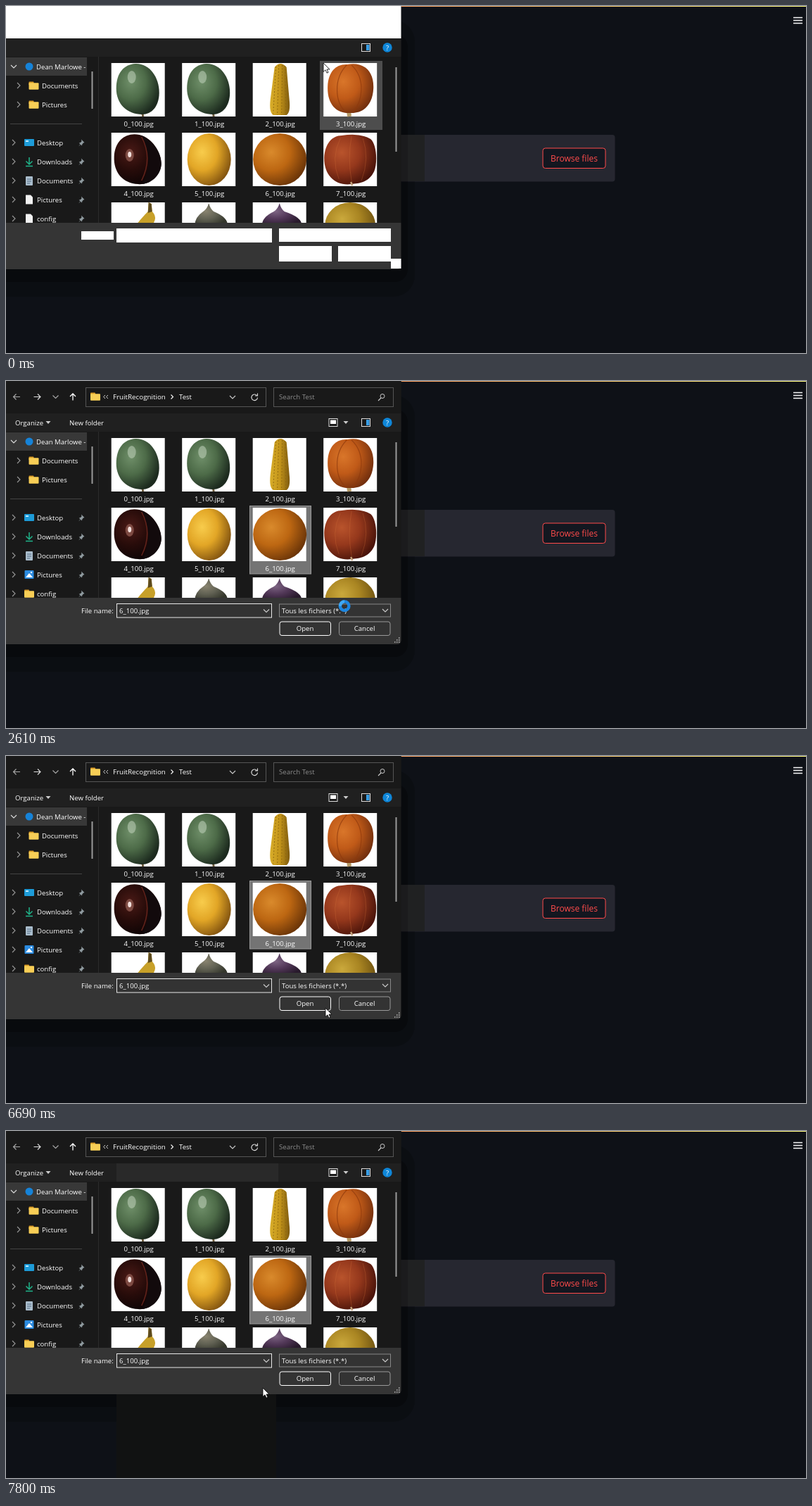
Animation of 1137x493 px, one loop 8 s. Source, as an HTML page:

```html
<!DOCTYPE html>
<html lang="en">
<head>
<meta charset="utf-8">
<title>File picker</title>
<style>
html, body { margin: 0; width: 100%; height: 100%; overflow: hidden; background: #0e1117; }
svg { display: block; width: 100vw; height: 100vh; }
text { font: 9.6px "Open Sans", "Noto Sans", sans-serif; fill: #fff; white-space: pre; }
</style>
</head>
<body>
<svg id="stage" viewBox="0 0 1137 493"></svg>
<script>
const LOOP = 8000;

// Markup helpers; text is centred on y with its baseline on a whole pixel
const text = (x, y, s, more = '') => `<text x="${x}" y="${Math.round(y + 3.5)}" ${more}>${s}</text>`;
const mid = (x, y, s, more = '') => text(x, y, s, `text-anchor="middle" ${more}`);
const rect = (x, y, w, h, fill, more = '') =>
  `<rect x="${x}" y="${y}" width="${w}" height="${h}" fill="${fill}" ${more}/>`;
const oval = (x, y, rx, ry, fill, more = '') =>
  `<ellipse cx="${x}" cy="${y}" rx="${rx}" ry="${ry}" fill="${fill}" ${more}/>`;
const dot = (x, y, r, fill) => oval(x, y, r, r, fill);
const line = (d, color = '#ddd', w = 1.1, more = '') =>
  `<path d="${d}" fill="none" stroke="${color}" stroke-width="${w}" ${more}/>`;
const fill = (d, color) => `<path d="${d}" fill="${color}"/>`;
const group = (id, s) => `<g id="${id}">${s}</g>`;
const glow = (id, a, b, c) => `<radialGradient id="${id}" cx=".34" cy=".36" r=".7">
  <stop stop-color="${a}"/><stop offset=".5" stop-color="${b}"/><stop offset="1" stop-color="${c}"/></radialGradient>`;
const right = (x, y, c = '#999') => line(`M${x - 2} ${y - 4}l4 4-4 4`, c);
const down = (x, y, c = '#ccc') => line(`M${x - 4} ${y - 2}l4 4 4-4`, c);
const folder = (x, y) => rect(x - 7, y - 5.5, 7, 5, '#d99a24', 'rx="1"') + rect(x - 7, y - 3.8, 14, 9.5, '#f8ce56', 'rx="1"');
const page = (x, y) => fill(`M${x - 5} ${y - 6.5}h7l3 3v10h-10z`, '#f2f2f2');
const picture = (x, y) => rect(x - 6.5, y - 6, 13, 12, '#2b8be0', 'rx="1"') +
  fill(`M${x - 5} ${y + 4}l5-6 5 6z`, '#fff') + dot(x + 3, y - 3, 1.2, '#fff');
const pin = (x, y) => fill(`M${x} ${y - 4.5}l4.5 4.5-1.6.6-1.6 1.8-.4 2.2-1.8-1.8-3 2.6 2.4-3.2-1.8-1.6 2.2-.6 1.6-1.8z`, '#8f9a9f');

const defs = `<defs>
  ${glow('green', '#6f8f69', '#4d6b48', '#1c2a1e')}
  ${glow('pumpkin', '#d9762a', '#c05a18', '#74300e')}
  ${glow('chestnut', '#4a1a16', '#280c0a', '#0c0405')}
  ${glow('lemon', '#f8cc4c', '#e2a626', '#835410')}
  ${glow('orange', '#d98a2c', '#bd6712', '#6b3508')}
  ${glow('apple', '#b9542c', '#95381c', '#4a140a')}
  ${glow('melon', '#cba93c', '#a98522', '#6c5010')}
  ${glow('violet', '#7c6482', '#523858', '#281a2c')}
  ${glow('olive', '#88836f', '#626254', '#34362c')}
  <linearGradient id="corn"><stop stop-color="#d9ae2a"/><stop offset=".5" stop-color="#c4951a"/><stop offset="1" stop-color="#7d5a0e"/></linearGradient>
  <linearGradient id="strip"><stop stop-color="#ff4b4b"/><stop offset="1" stop-color="#fffd80"/></linearGradient>
  <clipPath id="side"><path d="M0 72H115V308H0z"/></clipPath>
</defs>`;

const webPage = rect(0, 0, 1137, 493, '#0e1117') +
  rect(0, 0, 1137, 1, 'url(#strip)') +
  rect(500, 183, 365.5, 66.5, '#262730', 'rx="4"') +
  rect(763, 202, 89, 28.5, '#131720', 'rx="3.5" stroke="#ff4b4b"') +
  mid(807.5, 217, 'Browse files', 'style="font-size:12px;fill:#ff4b4b"') +
  line('M1119 16.5h13M1119 20.5h13M1119 24.5h13', '#fafafa', 1.5) +
  rect(-30, 20, 611, 393, '#000', 'rx="30" opacity=".2"') +
  rect(-30, 40, 601, 352, '#000', 'rx="18" opacity=".3"') +
  rect(561, 183, 10, 66, '#1b1b1d') + rect(571, 183, 24, 66, '#202122');

// Thumbnails, each drawn in its own 76 by 76 box
const kiwi = line('M44 70l1 6', '#6b5a3c', 3) +
  fill('M7 36C7 14 18 2 34 1 54 0 68 20 68 42 68 62 57 73 44 73 22 73 7 58 7 36z', 'url(#green)') +
  oval(29, 20, 6, 9, '#b9cbb4', 'opacity=".6"');
const fig = (c, w) => fill(`M38 1q2 8 7 12 ${w} 8 ${w} 20H${38 - w}q0-12 ${w - 8}-20 6-4 8-12z`, c);
const fruits = [
  kiwi, kiwi,
  fill('M31 6q8-10 17 0l4 46q2 18-4 22H29q-6-4-4-22z', 'url(#corn)') +
    line('M33 5L29 72M37 3L35 74M42 3L41 74M46 4L47 73', '#8f690f', 1, 'stroke-dasharray="2 2.4"'),
  line('M36 70l1 6', '#b59a68', 6) +
    fill('M6 33C7 12 18 1 34 2c22-4 38 8 37 34C70 58 58 72 38 71 18 72 5 58 6 33z', 'url(#pumpkin)') +
    line('M33 3C14 22 16 56 32 70M40 3C60 22 56 54 42 70', '#8d3a0d', 1.2, 'opacity=".7"'),
  fill('M4 34C5 10 22-1 40 3c18 4 32 26 31 42S53 75 38 73C16 72 3 56 4 34z', 'url(#chestnut)') +
    fill('M42 4c17 6 29 25 29 40S58 72 44 73q18-33-2-69z', '#120a0c') +
    oval(26, 32, 6, 9, '#7d4a42') + oval(26, 31, 2.5, 4, '#f3dfdc') +
    line('M43 6q16 30 0 62', '#63231b', 1.5),
  oval(38.5, 38, 31, 37, 'url(#lemon)'),
  oval(38.5, 38, 38, 37, 'url(#orange)'),
  fill('M1 36C2 16 12 4 26 4q26-4 41 5c9 8 10 34 5 46C64 72 48 72 40 73 18 76 1 62 1 36z', 'url(#apple)') +
    line('M24 8Q10 36 22 66M40 5q-6 30 0 64M56 8q10 28-2 60', '#d2713a', 1, 'opacity=".3"') +
    line('M39 70l2 5', '#c4a27c', 2.5),
  fill('M53 0l4 2 1 11q8 8 1 18H36q9-11 16-18z', '#c7a029') + fill('M53 0l4 2 1 11-6 2z', '#5c4a1e'),
  fig('url(#olive)', 20), fig('url(#violet)', 25),
  oval(38, 33, 36, 33, 'url(#melon)')
];
const thumbs = fruits.map((art, i) => {
  const x = 149.7 + i % 4 * 100.5, y = 81 + 99 * Math.floor(i / 4);
  return `<g transform="translate(${x} ${y})">${rect(0, 0, 76, 76, '#fff')}${art}${mid(39, 86, i + '_100.jpg')}</g>`;
}).join('');

const places = ['Desktop', 'Downloads', 'Documents', 'Pictures', 'config'].map((name, i) => {
  const y = 194 + 27 * i;
  return right(11, y) + text(44, y, name) + pin(107, y);
}).join('');
const sidebar = rect(0, 73, 115, 26, '#383838') + down(11, 86, '#ddd') + dot(33, 86, 5.5, '#1683d8') +
  `<g clip-path="url(#side)">${text(43, 86, 'Dean Marlowe - Personal')}</g>` +
  ['Documents', 'Pictures'].map((s, i) => right(18, 113 + 27 * i) + folder(39.5, 113 + 27 * i) + text(51, 113 + 27 * i, s)).join('') +
  rect(6, 167, 102, 1, '#444') + places +
  rect(26, 189, 14, 10, '#1d9bd8', 'rx="1"') + rect(28, 191, 4, 2, '#bfe9ff') +
  line('M33 215v9M28.5 220.5l4.5 4.5 4.5-4.5M28 227.5h10', '#1fb58a', 1.5) +
  rect(28, 242, 10, 13, '#a9bccb', 'rx="1"') + line('M30 246h6M30 249h6M30 252h4', '#56708a', 1) +
  rect(121.5, 93, 2, 53, '#9a9a9a') + rect(131, 72, 1, 236, '#2c2c2c') + rect(553.5, 87, 2, 120, '#9a9a9a');

const topBar = rect(0, 0, 561.5, 46, '#191919') +
  line('M20 22.5H10.5M14.5 18.5l-4 4 4 4', '#aaa') + line('M39.5 22.5H49M45 18.5l4 4-4 4') + down(70.5, 22.5, '#aaa') +
  line('M95 27.5V18M91 22l4-4 4 4', '#fff', 1.3) +
  rect(113.5, 9.5, 256, 27, '#191919', 'stroke="#555"') + rect(380.5, 9.5, 170, 27, '#191919', 'stroke="#555"') +
  folder(127, 22) + line('M141 20l-2.5 2.5 2.5 2.5M145 20l-2.5 2.5 2.5 2.5', '#ccc', 1) +
  text(152, 22.5, 'FruitRecognition', 'style="font-size:9.8px"') + line('M234.5 19.5l3 3-3 3', '#fff') + text(246, 22.5, 'Test') +
  down(322, 23) + line('M356.5 20.5a4.3 4.3 0 1 0 1 3M357.5 17.5v3.5h-3.5') +
  text(388, 22.5, 'Search Test', 'style="fill:#8c8c8c"') +
  `<circle cx="535" cy="21.5" r="3" fill="none" stroke="#ccc"/>` + line('M533 24l-4 4', '#ccc');

const tools = text(13, 59, 'Organize') + fill('M56.5 57h7l-3.5 4z', '#ccc') + text(90, 59, 'New folder') +
  rect(459, 53.5, 12, 11, '#191919', 'stroke="#ddd"') + rect(461, 55.5, 8, 5.5, '#fff') + fill('M479.5 57h7l-3.5 4z', '#ccc');

const form = text(107, 326, 'File name:') +
  rect(157.5, 316.5, 220, 19.5, '#333', 'stroke="#e8e8e8"') + down(370, 326.5) +
  rect(388.5, 317, 158, 18, '#333', 'stroke="#888"') + down(539, 326) + text(392, 326, 'Tous les fichiers (*.*)') +
  rect(389, 342, 72.5, 19.5, '#333', 'rx="3" stroke="#fff"') + mid(425, 351.7, 'Open') +
  rect(473.5, 342, 72.5, 19.5, '#333', 'rx="3" stroke="#999"') + mid(509.5, 351.7, 'Cancel') +
  line('M552 371h8M555 368h5M558 365h2', '#bbb', 1.5, 'stroke-dasharray="1.5 1.5"');

const blanks = [[0, 0, 561.5, 46], [107, 320, 46, 12], [157, 316, 221, 20], [388, 316, 159, 19],
  [388, 341, 75, 22], [472, 341, 75, 22], [547, 359, 14.5, 14]].map(b => rect(...b, '#fff')).join('');

const dialog = rect(0, 0, 561.5, 308, '#191919') + rect(0, 46, 561.5, 26, '#202020') +
  group('tint', rect(157, 46, 230, 26, '#292929')) +
  group('hover3', rect(446, 78, 89, 98, '#4d4d4d')) +
  group('hover2', rect(346, 78, 88, 98, '#4d4d4d')) +
  group('hover6', rect(346, 177, 88, 98, '#4d4d4d')) +
  group('picked', rect(346.5, 177.5, 87, 96.5, '#747474', 'stroke="#999"')) +
  sidebar + group('plainIcons', page(33, 275) + page(33, 302)) +
  group('fullIcons', picture(33, 275) + folder(33, 302)) + thumbs +
  rect(505.5, 53.5, 12, 11, '#191919', 'stroke="#ddd"') + rect(512, 55, 4.5, 8, '#3aa0e8') +
  dot(542, 59, 6.7, '#0e86d8') + mid(542, 59, '?', 'font-weight="700"') +
  fill('M0 308H561.5V368q0 6-6 6H0z', '#353535') + group('blanks', blanks) +
  group('ready', topBar + tools + form) + group('fileName', text(161, 326.5, '6_100.jpg'));

// Menu rows: label, icon colour (o for round), has submenu; a lone dash is a divider
const rows = [
  ['Set as desktop background'], ['Print'], ['ArcVel', '#a8506a', 1], ['Move to FileHull', 'o#1683d8'],
  ['Share with Tolvi', 'o#19a5ea'], ['Resize pictures', '#2b8be0'], ['BulkRetitle', '#1878c8'],
  ['Edit with OrbWell Standalone Edition', '#e6e04a'], ['Add to Favorites'], ['Open with Dune', '#2489ca'],
  ['HullSync Max', 'o#2a5db0', 1], '-', ['Resize pictures', '#2b8be0'], ['Rotate right'], ['Rotate left'], '-',
  ['Cast to Device', '', 1], ['Edit with Quilljot', '#a9c860'], ['Scan with Brimstead Sentinel...', '#1683d8'],
  ['Open with', '', 1], '-', ['Give access to', '', 1], ['Copy as path'], ["What's using this file?"],
  ['BulkRetitle', '#1878c8'], ['Restore previous versions'], '-', ['Send to', '', 1], '-', ['Cut'], ['Copy']
];
let rowY = -17.1;
const menu = rect(392.5, -5, 268, 505, '#2b2b2b', 'stroke="#3c3c3c"') +
  group('active', rect(397, 345, 260, 18, '#383838', 'rx="2"')) +
  rows.map(row => {
    if (row === '-') {
      rowY += 6;
      return rect(397, Math.round(rowY + 6), 260, 1, '#414141');
    }
    const [label, icon = '', more] = row, y = rowY += 18.6;
    const mark = icon[0] === 'o' ? dot(408, y, 5.8, icon.slice(1)) : icon ? rect(402.5, y - 5.5, 11, 11, icon) : '';
    const dim = label === 'HullSync Max' ? 'style="fill:#777"' : '';
    return text(423, y, label, dim) + mark + (more ? line(`M645 ${y - 3}l3 3-3 3`, '#ddd') : '');
  }).join('');
const submenu = rect(657.5, 343.5, 169, 44, '#2b2b2b', 'rx="2" stroke="#454545"') +
  line('M669.5 356v-3a2.5 2.5 0 0 1 5 0v3', '#d9a51e', 1.3) + rect(667.5, 355, 9, 6.5, '#f5b922', 'rx="1"') +
  text(687, 356, 'Remove access') + folder(672, 374.5) + dot(675, 377, 2.6, '#2b9be0') + text(687, 374.5, 'Specific people...');

const arrow = `<path d="M0 0V12.5L3 9.8 5 14.2 7 13.3 5 9H9Z" fill="#fff" stroke="#000" stroke-width=".8"/>`;
const ring = `<circle r="6.3" fill="none" stroke="#1d86e0" stroke-width="4.4"/>` +
  line('M-6.3 0A6.3 6.3 0 0 1 0-6.3', '#3fa9f5', 4.4);

const stage = document.getElementById('stage');
stage.innerHTML = defs + webPage + group('ghost', rect(157, 374, 227, 119, '#111212')) + dialog +
  group('menu', menu) + group('submenu', submenu) + group('pointer', group('arrow', arrow) + group('ring', ring));

// When each part is on stage
const spans = {
  plainIcons: [0, 120], blanks: [0, 120], hover3: [0, 120], fullIcons: [120], ready: [120],
  hover2: [120, 490], hover6: [490, 990], picked: [990], fileName: [850], ghost: [6810], tint: [6810],
  menu: [6810, 7800], active: [6930, 7800], submenu: [6930, 7800], ring: [1390, 6090]
};

// Pointer moves: first change, last change, number of steps, destination
const moves = [
  [120, 120, 1, 405, 110], [370, 850, 5, 390, 201], [990, 1240, 3, 389, 202], [1390, 1510, 2, 393, 209],
  [1760, 1760, 1, 530, 228], [1880, 1880, 1, 574, 229], [2130, 2850, 7, 444, 356], [2970, 3090, 2, 439, 356],
  [3340, 3460, 2, 437, 356], [5240, 5240, 1, 439, 354], [5360, 5970, 6, 412, 320], [6090, 6690, 6, 454, 358],
  [6930, 7410, 5, 365, 365]
];
function pointerAt(t) {
  let x = 451, y = 81;
  for (const [start, end, steps, toX, toY] of moves) {
    if (t < start) break;
    const done = t >= end ? 1 : (1 + Math.floor((t - start) / (end - start) * (steps - 1))) / steps;
    x += (toX - x) * done;
    y += (toY - y) * done;
  }
  return [x, y];
}

const el = id => document.getElementById(id);
const show = (id, on) => el(id).setAttribute('visibility', on ? 'visible' : 'hidden');
function draw(now) {
  const t = now % LOOP;
  for (const [id, [from, to = LOOP]] of Object.entries(spans)) show(id, t >= from && t < to);
  show('arrow', t < spans.ring[0] || t >= spans.ring[1]);
  el('pointer').setAttribute('transform', `translate(${pointerAt(t)})`);
}
const begin = performance.now();
function tick() {
  draw(performance.now() - begin);
  requestAnimationFrame(tick);
}
tick();
</script>
</body>
</html>
```
